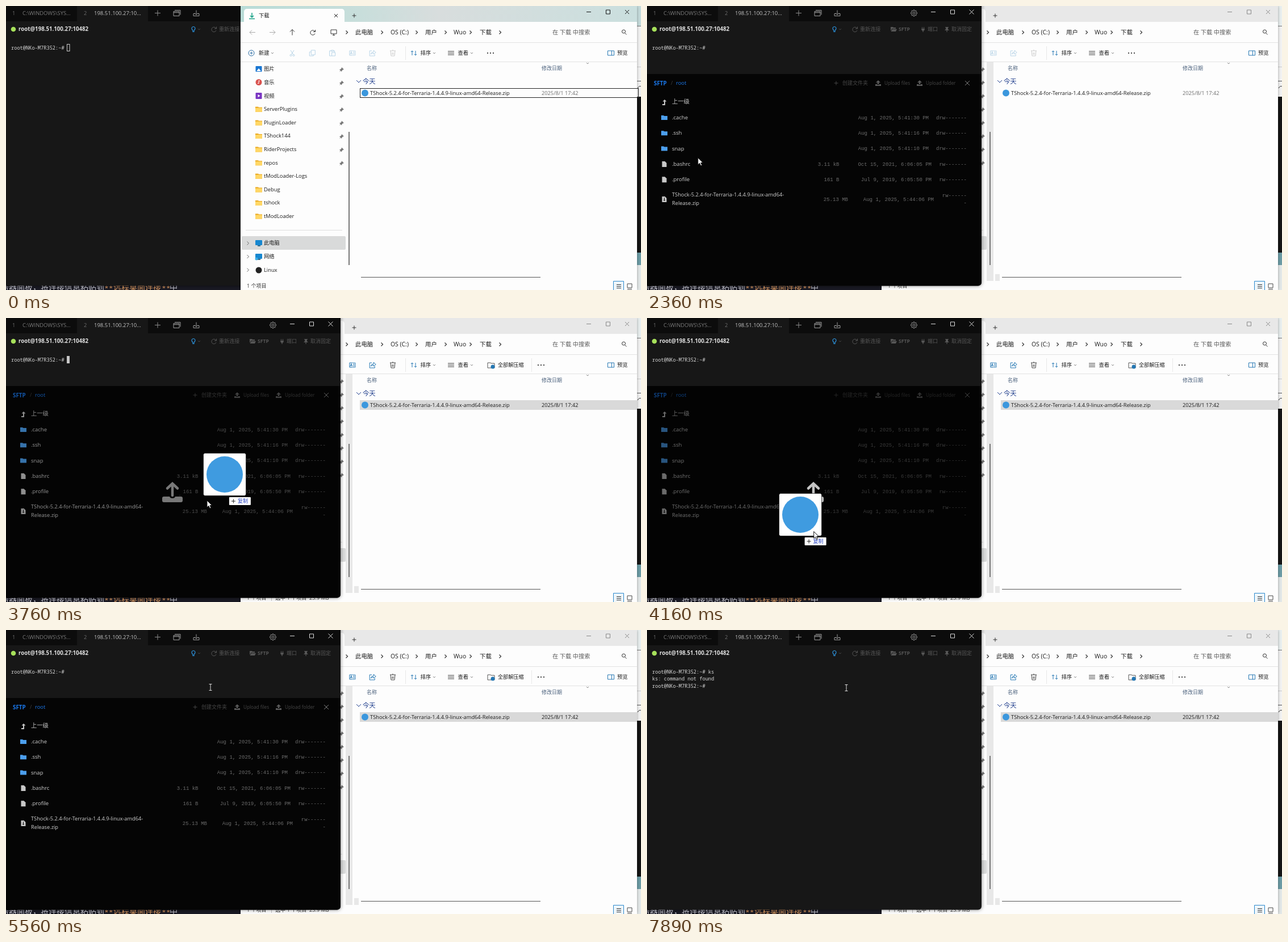
Write an HTML page with a canvas that moves like this. It is 1118 by 501 pixels and loops after 8 s.

```html
<!DOCTYPE html>
<html lang="zh-CN">
<head>
<meta charset="utf-8">
<title>SFTP</title>
<style>
html, body { margin: 0; width: 100%; height: 100%; overflow: hidden; background: #161616; }
canvas { display: block; }
</style>
</head>
<body>
<canvas id="stage" width="1118" height="501"></canvas>
<script>
const ctx = document.getElementById('stage').getContext('2d');
const LOOP = 8000;
const SANS = '"Open Sans","Noto Sans CJK SC","Noto Sans CJK",sans-serif';
const MONO = '"Noto Sans Mono","DejaVu Sans Mono",monospace';
const COURIER = '"Liberation Mono",monospace';
const HOST = 'root@198.51.100.27:10482';
const PROMPT = 'root@NKo-M7R352:~#';
const ZIP = 'TShock-5.2.4-for-Terraria-1.4.4.9-linux-amd64-';

// Moments of the story, in ms
const T = { enter: 240, front: 560, open: 1200, loaded: 1760, select: 3280, drag: 3360, refocus: 3440,
  over: 3640, leave: 4600, drop: 4840, close: 5740, typeK: 6920, typeS: 7030, run: 7240 };

const MOUSE = [[240, 760, 490], [540, 400, 300], [680, 400, 260], [1040, 447, 42], [1360, 447, 42], [1600, 581, 118],
  [1840, 740, 153], [1960, 690, 165], [2360, 90, 268], [2600, 32, 230], [2800, 68, 200], [3120, 682, 153],
  [3280, 678, 153], [3360, 641, 161], [3400, 633, 170], [3880, 262, 372], [4080, 255, 376], [4120, 269, 376],
  [4160, 293, 377], [4600, 589, 226], [4680, 677, 180], [4860, 677, 180], [5480, 360, 101], [6900, 360, 101], [7020, 351, 102]];

const clamp = v => Math.max(0, Math.min(1, v));
const ramp = (t, start, length) => clamp((t - start) / length);

function mouseAt(t) {
  const i = MOUSE.findIndex(k => k[0] > t);
  if (i < 0) return MOUSE[MOUSE.length - 1].slice(1);
  if (i === 0) return MOUSE[0].slice(1);
  const [a, b] = [MOUSE[i - 1], MOUSE[i]];
  const f = (t - a[0]) / (b[0] - a[0]);
  return [a[1] + (b[1] - a[1]) * f, a[2] + (b[2] - a[2]) * f];
}

// y is the middle of the capital letters
function text(s, x, y, size, color, { weight = 400, font = SANS, align = 'left' } = {}) {
  ctx.font = `${weight} ${size}px ${font}`;
  ctx.textAlign = align;
  ctx.fillStyle = color;
  ctx.fillText(s, x, y + size * 0.36);
}
function rect(x, y, w, h, color) {
  ctx.fillStyle = color;
  ctx.fillRect(x, y, w, h);
}
function round(x, y, w, h, r, fill, stroke) {
  ctx.beginPath();
  ctx.roundRect(x, y, w, h, r);
  if (fill) { ctx.fillStyle = fill; ctx.fill(); }
  if (stroke) { ctx.strokeStyle = stroke; ctx.lineWidth = 1; ctx.stroke(); }
}
function dot(x, y, r, color) {
  ctx.beginPath();
  ctx.arc(x, y, r, 0, 7);
  ctx.fillStyle = color;
  ctx.fill();
}
function icon(x, y, d, stroke, { fill, width = 1, cap = 'butt' } = {}) {
  ctx.save();
  ctx.translate(x, y);
  const path = new Path2D(d);
  if (fill) { ctx.fillStyle = fill; ctx.fill(path); }
  if (stroke) {
    ctx.strokeStyle = stroke;
    ctx.lineWidth = width;
    ctx.lineCap = cap;
    ctx.stroke(path);
  }
  ctx.restore();
}

const I = {
  plus: 'M-5 0H5M0-5V5', close: 'M-4-4L4 4M4-4L-4 4', min: 'M-4 .5H4', max: 'M-3.5-3.5H3.5V3.5H-3.5Z',
  right: 'M-1.5-3L1.5 0L-1.5 3', down: 'M-2-1L0 1L2-1', bigDown: 'M-4-2L0 2L4-2',
  left: 'M5 0H-5M-1-4L-5 0L-1 4', forward: 'M-5 0H5M1-4L5 0L1 4', up: 'M0 5V-5M-4-1L0-5L4-1',
  reload: 'M4-1A4.2 4.2 0 1 0 4 2M4.5-4.5V-1H1',
  save: 'M0-5V3M-3 0L0 3L3 0M-2 1H-5V5H5V1H2', tabs: 'M-6-3H4V5H-6ZM-4-5H6V3M-6-1H4',
  folder: 'M-6-4H-1L0-3H6V5H-6Z', blueFolder: 'M-5.5-4H-1.5L0-3H5.5V4H-5.5Z',
  openFolder: 'M-5-4H-1L0-3H4V-1H-2.5L-5 3ZM-2-.3H6L4 4H-4.5Z', doc: 'M-4-5H1L4-2V5H-4Z',
  pushpin: 'M0-4L4 0L2 .5L.5 2L0 4L-1.7 2.3L-4 4.5L-2.3 1.7L-4 0L-2-.5L-.5-2Z',
  tack: 'M-3-4H3V-3H2V0L4 2H.6V5H-.6V2H-4L-2 0V-3H-3Z',
  plug: 'M-3-1H3Q3 2 .6 3V5H-.6V3Q-3 2-3-1ZM-2-4H-1V-1H-2ZM1-4H2V-1H1Z',
  upload: 'M0-5L4-1H1.3V2H-1.3V-1H-4ZM-5 2H-2V3H2V2H5V5H-5Z',
  cut: 'M-3-5L2 3M3-5L-2 3M-4 4A1.5 1.5 0 1 0-1 4A1.5 1.5 0 1 0-4 4M1 4A1.5 1.5 0 1 0 4 4A1.5 1.5 0 1 0 1 4',
  copy: 'M-2-5H5V3H-2ZM-2-2H-5V5H2V3', paste: 'M-2-4H-5V5H-1M2-4H4V-1M-2-5H2V-3H-2ZM-1-1H5V5H-1Z',
  rename: 'M1-4H-5V4H1M4-4H5V4H4M2.5-5V5M-4 2.5L-2-2.5L0 2.5M-3.2 1H-.8',
  share: 'M-1-4H-5V5H4V2M-3 2Q-2-2 2-2V-5L6-1L2 2V0Q-1 0-3 2', trash: 'M-5-4H5M-1-5H1M-4-4L-3 5H3L4-4M-1-1V3M1-1V3',
  sort: 'M-3 4V-4M-5-2L-3-4L-1-2M3-4V4M1 2L3 4L5 2', list: 'M-5-3H6M-5 0H6M-5 3H6',
  arrow: 'M0 0V12L2.9 9.5L5 14L7 13.1L5 8.7H8.7Z',
  back: 'M0-5L3.5-1.5H1V5H-4V3H-1V-1.5H-3.5Z'
};

function desktop(t) {
  rect(0, 0, 1118, 501, '#191923');
  text('务器面板，将连接信息粘贴到', -9, 496, 14, '#c6c6d0');
  text('远程桌面连接', 189, 496, 14, '#dc9a61');
  for (const x of [173, 274]) text('**', x, 498, 13, '#dc9a61', { font: MONO });
  text('中', 288, 496, 14, '#c6c6d0');
  rect(1110, 0, 8, 35, t < T.front ? '#c6dcdc' : '#eaf0f0');
  rect(1110, 35, 8, 125, '#f3f3f3');
  rect(1110, 35, 8, 1, '#777');
  rect(1110, 107, 8, 1, '#ccc');
  rect(1110, 132, 8, 1, '#555');
  icon(1112, 143, 'M0 2Q3-3 6-1', '#333');
  rect(1110, 160, 8, 275, '#141414');
  rect(1110, 435, 8, 22, '#6c9ca5');
  rect(1110, 457, 8, 44, '#e4e9e9');
}

function yellowFolder(x, y) {
  icon(x, y, I.folder, null, { fill: '#e9a820' });
  round(x - 6, y - 2, 12, 7, 1, '#ffd766');
}

function sidebar() {
  ['图片', '音乐', '视频', 'ServerPlugins', 'PluginLoader', 'TShock144', 'RiderProjects', 'repos',
    'tModLoader-Logs', 'Debug', 'tshock', 'tModLoader'].forEach((name, i) => {
    const y = 111 + i * 23.6;
    if (i > 2) yellowFolder(445, y);
    text(name, 454, y, 9.3, '#1b1b1b');
    if (i < 8) icon(591, y + 1, I.pushpin, null, { fill: '#777' });
  });
  round(439.5, 106, 11, 10, 1, '#1976d2');
  icon(445, 111, 'M-4 4L0-1L4 4Z', null, { fill: '#fff' });
  dot(445, 134.5, 5.5, '#d9534f');
  icon(445, 134.5, 'M0 2V-3L2-2M-2 2H0', '#fff');
  round(439.5, 153, 11, 11, 1, '#7a35c2');
  icon(445, 158.5, 'M-1.5-2.5L2.5 0L-1.5 2.5Z', null, { fill: '#fff' });
  rect(422, 395, 170, 1, '#dedede');
  round(415, 406, 183, 24, 2, '#d9dada');
  ['此电脑', '网络', 'Linux'].forEach((name, i) => {
    const y = 418 + i * 23.6;
    icon(426, y + 0.5, I.right, '#666');
    text(name, 454, y, 9.3, '#1b1b1b');
  });
  for (const y of [418, 442]) {
    round(439, y - 5, 12, 9, 1, '#1687d0');
    rect(443, y + 4, 5, 2, '#3f6f8c');
  }
  dot(441, 446, 2.5, '#3bb0e8');
  dot(445, 466, 5.5, '#222');
}

function explorer(t) {
  const focused = t < T.front;
  const selected = t >= T.select;
  ctx.save();
  ctx.shadowColor = 'rgba(0,0,0,.35)';
  ctx.shadowBlur = 5;
  rect(413, 0, 698, 501, '#fdfdfd');
  ctx.restore();
  const title = ctx.createLinearGradient(413, 0, 1111, 0);
  title.addColorStop(0, focused ? '#b9dcd7' : '#e8e8e8');
  title.addColorStop(0.3, focused ? '#c8dedb' : '#e8e8e8');
  title.addColorStop(0.5, focused ? '#d8dddd' : '#e8e8e8');
  title.addColorStop(1, focused ? '#cadfde' : '#e8e8e8');
  rect(413, 0, 698, 28, title);
  round(419, 5, 177, 25, [5, 5, 0, 0], '#fdfdfd');
  icon(433, 17, 'M0-5V3M-3 0L0 3L3 0M-5 5.5H5', '#16a085', { width: 1.5 });
  text('下载', 445, 17, 9.3, '#1b1b1b');
  icon(581, 17, 'M-3-3L3 3M3-3L-3 3', '#222');
  icon(613, 17, 'M-3.5 0H3.5M0-3.5V3.5', '#333');
  const buttons = focused ? '#111' : '#888';
  icon(1026, 10, I.min, buttons);
  icon(1060, 10.5, I.max, buttons);
  icon(1093.5, 10.5, 'M-3.5-3.5L3.5 3.5M3.5-3.5L-3.5 3.5', buttons);

  icon(434, 46.5, I.left, '#aaa');
  icon(469, 46.5, I.forward, '#aaa');
  icon(504, 46.5, I.up, '#333');
  icon(540, 46.5, I.reload, '#333');
  icon(577, 46, 'M-5-4H5V3H-5ZM-2 5.5H2M0 3V5', '#333');
  [600, 662, 723, 774, 818, 870].forEach(x => icon(x, 46.5, I.right, '#333', { width: 1.2 }));
  [['此电脑', 615], ['OS (C:)', 677], ['用户', 738], ['Wuo', 788], ['下载', 834]]
    .forEach(([s, x]) => text(s, x, 46.5, 10.4, '#1b1b1b'));
  text('在 下载 中搜索', 962, 46.5, 10.2, '#5a5a5a');
  icon(1088, 46, 'M-3.5-1A3 3 0 1 0 2.5-1A3 3 0 1 0-3.5-1M1.5 1.5L4.5 4.5', '#333');
  rect(413, 64, 698, 1, '#e3e3e3');

  icon(432, 83, 'M-5 0A5 5 0 1 0 5 0A5 5 0 1 0-5 0M-2.5 0H2.5M0-2.5V2.5', '#2b6ca3');
  text('新建', 445, 83, 9.3, '#1b1b1b');
  const tool = selected ? '#2477b3' : '#b9d5e8';
  [I.cut, I.copy, I.paste, I.rename, I.share].forEach((d, i) => icon(504 + i * 35.3, 83, d, tool));
  icon(681, 83, I.trash, selected ? '#444' : '#ccc');
  icon(718, 83, I.sort, '#2477b3');
  text('排序', 729.5, 83, 9.3, '#1b1b1b');
  icon(783, 83, I.list, '#333');
  text('查看', 795.5, 83, 9.3, '#1b1b1b');
  [469, 754, 820].forEach(x => icon(x, 83, I.down, '#888'));
  rect(703, 71, 1, 24, '#e8e8e8');
  if (selected) {
    icon(854, 83, I.folder, '#555');
    dot(857, 86, 3.5, '#2477b3');
    text('全部解压缩', 866, 83, 9.1, '#1b1b1b');
    rect(925, 71, 1, 24, '#e8e8e8');
  }
  const more = selected ? 942 : 853;
  for (const d of [-5, 0, 5]) dot(more + d, 83, 1.1, '#222');
  icon(1065, 83, 'M-5.5-4H5.5V4H-5.5ZM1.5-4V4', '#2477b3');
  text('预览', 1076, 83, 9.3, '#1b1b1b');
  rect(413, 98, 698, 1, '#e3e3e3');

  if (!focused) {
    rect(598, 99, 12, 386, '#e8e8e8');
    rect(613, 473, 8, 12, '#e8e8e8');
  }
  sidebar();
  rect(603, 222, 2, 235, '#777');

  text('名称', 635, 110, 9, '#4a607c');
  text('修改日期', 943, 110, 9, '#4a607c');
  icon(1024, 101, I.down, '#888');
  icon(621, 133, I.bigDown, '#1f3d8c');
  text('今天', 628, 133, 11.3, '#1f3d8c');
  fileRow(t, focused, selected);

  rect(625, 478, 316, 1, '#555');
  text('1 个项目', 424, 494, 9, '#333');
  if (selected) {
    text('|', 465, 494, 9, '#999');
    text('选中 1 个项目  23.9 MB', 474, 494, 9.1, '#333');
  }
  round(1069.5, 485.5, 18, 18, 0, '#eef6fb', '#2b88cc');
  icon(1079, 494, 'M-4-2.5H4M-4 .5H4M-4 3.5H4', '#333');
  icon(1098, 494, 'M-4-4H4V3H-4ZM-4 5.5H4', '#444');
}

function fileRow(t, focused, selected) {
  const [x, y] = mouseAt(t);
  const active = selected && t < T.refocus;
  const hover = t > T.front && x > 623 && y > 145 && y < 162;
  const color = active ? '#cce8f7' : selected ? '#d9d9d9' : hover ? '#e5f3fb' : null;
  if (color) rect(623, 145, 488, 17, color);
  if (focused || active) {
    ctx.strokeStyle = '#222';
    ctx.lineWidth = 1;
    ctx.strokeRect(623.5, 145.5, 490, 16);
  }
  dot(632, 153.5, 6, '#3b97dd');
  text(ZIP + 'Release.zip', 641, 153.5, 9.27, '#1b1b1b');
  text('2025/8/1 17:42', 943, 153.5, 9.25, selected ? '#1b1b1b' : '#6d6d6d');
}

function terminal(t) {
  ctx.save();
  ctx.shadowColor = 'rgba(0,0,0,.5)';
  ctx.shadowBlur = 6;
  round(-8, -8, 597, 501.5, 6, '#171717');
  ctx.restore();
  ctx.save();
  ctx.beginPath();
  ctx.roundRect(-8, -8, 597, 501.5, 6);
  ctx.clip();
  rect(0, 0, 589, 27, '#0c0c0c');
  rect(125, 0, 125, 27, '#171717');
  text('1', 11, 12.5, 9.3, '#6c6c6c');
  text('C:\\WINDOWS\\SYS...', 29, 12.5, 9.4, '#7c7c7c');
  text('2', 137, 12.5, 9.3, '#6c6c6c');
  text('198.51.100.27:10...', 155, 12.5, 9.5, '#c4c4c4');
  icon(267, 12.5, I.plus, '#8b8b8b');
  icon(301, 12.5, I.tabs, '#9b9b9b');
  icon(335, 12.5, I.save, '#9b9b9b');
  gear(470, 12.5);
  icon(504, 10, I.min, '#ddd');
  icon(538, 10.5, I.max, '#ddd');
  icon(571.5, 10.5, I.close, '#ddd');

  dot(13, 41, 4.3, '#a6e05a');
  text(HOST, 22, 41, 9.7, '#dedede', { weight: 700 });
  icon(330, 41, 'M-1 4.5V2Q-3 .5-3-1.5A3 3 0 0 1 3-1.5Q3 .5 1 2V4.5Z', '#2b93dd', { width: 1.2 });
  icon(340, 41, I.down, '#444');
  const dim = '#565656';
  icon(366, 41, I.reload, dim);
  text('重新连接', 375, 41, 9.1, dim);
  icon(434, 41, I.openFolder, null, { fill: dim });
  text('SFTP', 443, 41, 8.6, dim, { weight: 700 });
  icon(486, 41, I.plug, null, { fill: dim });
  text('端口', 494, 41, 9, dim);
  icon(528, 41, I.tack, null, { fill: dim });
  text('取消固定', 536, 41, 9, dim);

  shell(t);
  panel(t);
  ctx.restore();
}

function gear(x, y) {
  ctx.strokeStyle = '#9b9b9b';
  ctx.lineWidth = 1;
  ctx.beginPath();
  for (let i = 0; i <= 48; i++) {
    const a = i / 48 * Math.PI * 2, r = 4.9 + 0.7 * Math.sign(Math.cos(a * 8));
    ctx.lineTo(x + r * Math.cos(a), y + r * Math.sin(a));
  }
  ctx.moveTo(x + 2, y);
  ctx.arc(x, y, 2, 0, 7);
  ctx.stroke();
}

function shell(t) {
  const ran = t >= T.run;
  const typed = t < T.typeK ? '' : t < T.typeS ? 'k' : 'ks';
  const line = (s, row) => text(s, 9, 73.5 + row * 12.5, 8.68, '#d8d8d8', { font: MONO });
  line(`${PROMPT} ${typed}`, 0);
  if (ran) {
    line('ks: command not found', 1);
    line(PROMPT, 2);
  }
  const x = 107 + (ran ? 0 : typed.length * 5.2);
  const y = ran ? 92 : 67;
  if (t < T.front || (t >= T.select && t < T.refocus)) {
    ctx.strokeStyle = '#ccc';
    ctx.lineWidth = 1;
    ctx.strokeRect(x + 0.5, y + 0.5, 4.5, 12);
    return;
  }
  const start = ran ? 7280 : t >= T.typeK ? T.typeK : t >= T.refocus ? 3360 : 360;
  if (Math.floor((t - start) / 600) % 2 === 0 || (ran && t < 7280)) rect(x, y, 5, 13, '#c8c8c8');
}

function panel(t) {
  const shown = ramp(t, T.open, 200) * (1 - ramp(t, T.close, 200));
  if (!shown) return;
  ctx.save();
  ctx.globalAlpha = shown;
  ctx.translate(0, (1 - shown) * 110);
  rect(0, 120, 589, 490, '#050505');
  text('SFTP', 12, 136, 9.9, '#1a78ec', { weight: 700 });
  text('/', 42, 136, 9, '#444');
  text('root', 51, 136, 9.4, '#1a78ec');
  const dim = '#474747';
  icon(333, 136, 'M-3.5 0H3.5M0-3.5V3.5', dim);
  text('创建文件夹', 344, 136, 9, dim);
  icon(407, 136, I.upload, null, { fill: '#5a5a5a' });
  text('Upload files', 418, 136, 8.2, dim);
  icon(480, 136, I.upload, null, { fill: '#5a5a5a' });
  text('Upload folder', 491, 136, 8.2, dim);
  icon(564, 136, I.close, '#808080');
  if (t < T.loaded) text('加载中', 12, 162, 10.3, '#c4c4c4');
  else fileList();

  const drop = ramp(t, T.over, 200) * (1 - ramp(t, T.leave, 200));
  rect(0, 120, 589, 380, `rgba(0,0,0,${drop * 0.47})`);
  ctx.globalAlpha = drop;
  icon(293, 308, 'M-9-7.5L0-16L9-7.5M0-15V5', '#c4c4c4', { width: 4.5, cap: 'round' });
  icon(293, 308, 'M-15 7H-5Q-4 10 0 10Q4 10 5 7H15Q18 7 18 10V14Q18 17 15 17H-15Q-18 17-18 14V10Q-18 7-15 7Z', null, { fill: '#c4c4c4' });
  dot(306, 313, 1.5, '#222');
  ctx.restore();
}

function fileList() {
  const mono = (s, right, y) => text(s, right, y, 9, '#6b6b6b', { font: COURIER, align: 'right' });
  icon(31, 170, I.back, null, { fill: '#c8c8c8' });
  text('上一级', 44, 168.5, 10.3, '#c8c8c8');
  [['.cache', 'Aug 1, 2025, 5:41:30 PM'], ['.ssh', 'Aug 1, 2025, 5:41:16 PM'], ['snap', 'Aug 1, 2025, 5:41:10 PM'],
    ['.bashrc', 'Oct 15, 2021, 6:06:05 PM', '3.11 kB'], ['.profile', 'Jul 9, 2019, 6:05:50 PM', '161 B']]
    .forEach(([name, date, size], i) => {
      const y = 196.5 + i * 27.3;
      if (size) icon(30.5, y + 0.5, I.doc, null, { fill: '#c8c8c8' });
      else icon(30.5, y + 0.5, I.blueFolder, null, { fill: '#4c9fee' });
      text(name, 44, y, 9.5, '#d2d2d2');
      if (size) mono(size, 338.5, y);
      mono(date, size ? 501 : 496, y);
      mono(size ? 'rw-------' : 'drw-------', 563, y);
    });
  icon(30.5, 341, I.doc, null, { fill: '#c8c8c8' });
  icon(30.5, 341, 'M0-3V2M-1.5 1L0 2.5L1.5 1', '#111');
  text(ZIP, 44, 332.5, 9.25, '#d2d2d2');
  text('Release.zip', 44, 348, 9.25, '#d2d2d2');
  mono('25.13 MB', 354, 340.5);
  mono('Aug 1, 2025, 5:44:06 PM', 505, 340.5);
  mono('rw------', 563, 334);
  mono('-', 563, 347);
}

function dragged(t) {
  if (t < T.drag || t >= T.drop) return;
  const [x, y] = mouseAt(t - 40); // the picture trails the pointer
  const left = Math.round(x - 38) + 0.5, top = Math.round(y - 67) + 0.5;
  round(left, top, 75, 75, 3, '#fff', 'rgba(0,0,0,.65)');
  if (t >= T.refocus) dot(left + 37.5, top + 37.5, 32, '#3f9be0');
}

function dragHint(t) {
  if (t < T.drag || t >= T.drop) return;
  const [x, y] = mouseAt(t - 40);
  if (x < 589 && y > 120) {
    round(x + 8, y + 11, 38, 14, 1, '#fff');
    icon(x + 15.5, y + 18, 'M-3.5 0H3.5M0-3.5V3.5', '#222');
    text('复制', x + 23, y + 18, 9, '#2440c0');
  } else {
    dot(x + 15.5, y + 18, 4.5, '#fff');
    icon(x + 15.5, y + 18, 'M-4 0A4 4 0 1 0 4 0A4 4 0 1 0-4 0M-2.8 2.8L2.8-2.8', '#d23a3a', { width: 1.2 });
  }
}

function pointer(t) {
  if (t < T.enter) return;
  const [x, y] = mouseAt(t);
  const dragging = t >= T.drag && t < T.drop;
  const overShell = t > T.front && x < 580 && y > 56 && (y < 120 || t < T.open || t > T.close);
  if (overShell && !dragging) icon(x, y, 'M-2.5-5.5H2.5M-2.5 5.5H2.5M0-5.5V5.5', '#ddd');
  else icon(x, y, I.arrow, '#111', { fill: '#fff' });
}

function draw(t) {
  desktop(t);
  if (t < T.front) { terminal(t); explorer(t); }
  else { explorer(t); terminal(t); }
  dragged(t);
  dragHint(t);
  pointer(t);
}

const begin = performance.now();
function frame() {
  draw((performance.now() - begin) % LOOP);
  requestAnimationFrame(frame);
}
frame();
</script>
</body>
</html>
```
